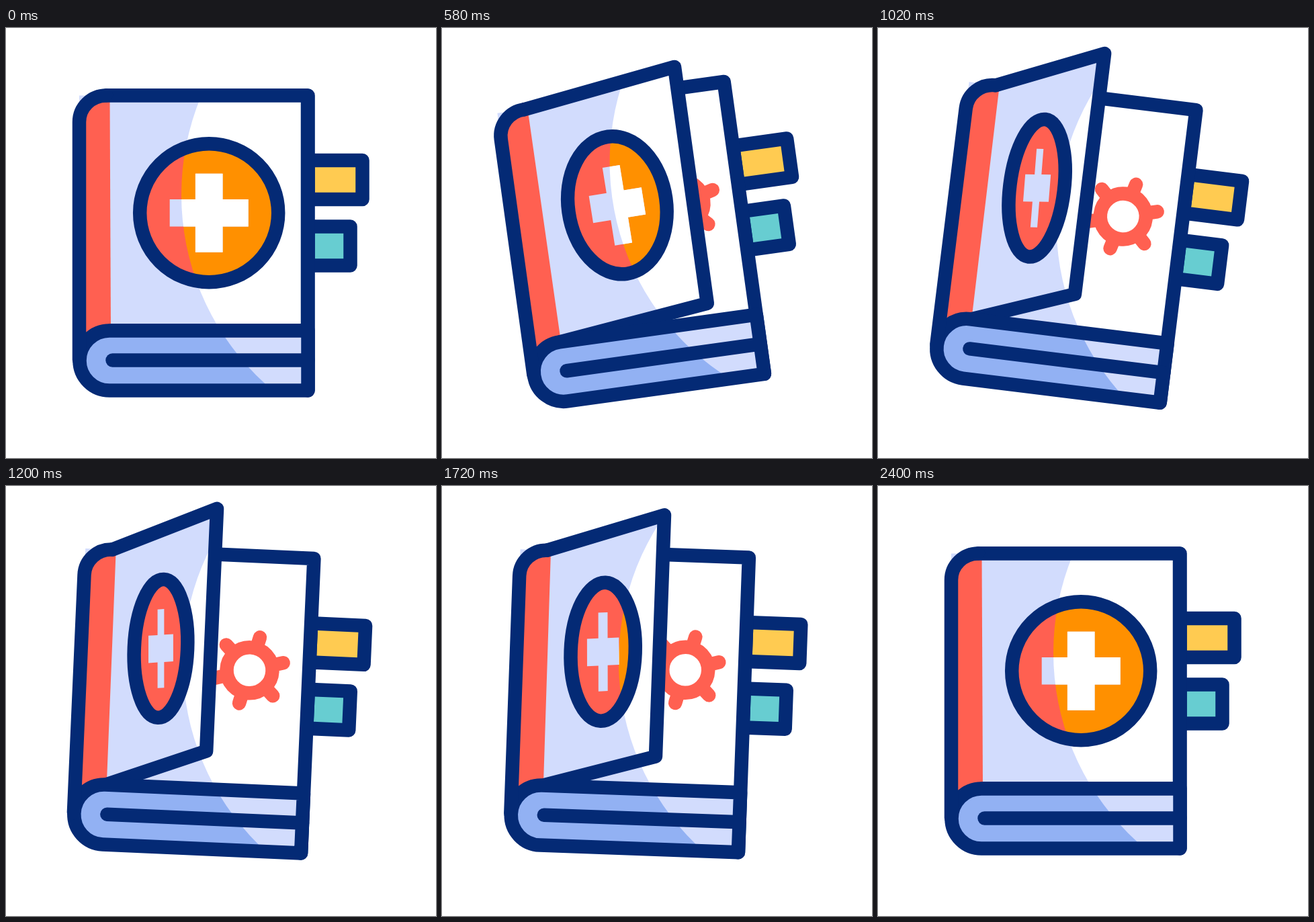
An HTML page with a canvas that plays this animation: 640 by 640 pixels, repeating every 3.6 s.

```html
<!DOCTYPE html>
<html lang="en">
<head>
<meta charset="utf-8">
<title>Medical book</title>
<style>
  html, body { margin: 0; width: 100%; height: 100%; overflow: hidden; background: #fff; }
  canvas { display: block; width: 100vmin; height: 100vmin; }
</style>
</head>
<body>
<canvas id="stage" width="640" height="640"></canvas>
<script>
const ctx = document.getElementById('stage').getContext('2d');
const LOOP = 3600, MAX_OPEN = 147, PIVOT = [286, 306.5];
const NAVY = '#042a75', RED = '#ff6051', ORANGE = '#ff9000', WHITE = '#fff';
const PALE = '#d2dcfd', BLUE = '#92b1f3', YELLOW = '#ffcb51', TEAL = '#67cdd1';

// Damped wobble of the whole book: [ms, degrees]
const WOBBLE = [[400, 0], [765, -16], [1056, 8], [1364, -4], [1676, 2.2], [1990, 0]];

// Everything inside this large circle is lit, the rest is in shade
const light = new Path2D();
light.arc(641, 248, 380, 0, 7);

const page = new Path2D('M109 100.5H449.5V450.5H109Z');
const pageEdge = new Path2D('M149 100.5H449.5V539.5');
const spine = new Path2D('M109 495V140A40 39.5 0 0 1 149 100.5H154.5L156 450.5Z');
const spineEdge = new Path2D('M109 494V140A40 39.5 0 0 1 149 100.5');
const block = new Path2D('M449.5 450.5H154A44.5 44.5 0 0 0 154 539.5H449.5Z');
const blockLine = new Path2D('M158.5 494.5H449.5');

const gear = new Path2D();
gear.arc(361, 271, 34, 0, 7);
for (let i = 0; i < 6; i++) {
  const a = (i * 60 - 75) * Math.PI / 180, c = Math.cos(a), s = Math.sin(a);
  gear.moveTo(361 + 36 * c, 271 + 36 * s);
  gear.lineTo(361 + 51.4 * c, 271 + 51.4 * s);
}

const clamp = p => Math.min(1, Math.max(0, p));
const smooth = p => p * p * (3 - 2 * p);

// cubic-bezier(a, 0, b, 1)
function bezier(p, a, b) {
  let lo = 0, hi = 1;
  for (let i = 0; i < 24; i++) {
    const t = (lo + hi) / 2, u = 1 - t;
    if (3 * a * t * u * u + 3 * b * t * t * u + t * t * t < p) lo = t; else hi = t;
  }
  return smooth(lo);
}

function tilt(t) {
  for (let i = 1; i < WOBBLE.length; i++) {
    const [t0, a] = WOBBLE[i - 1], [t1, b] = WOBBLE[i];
    if (t < t1) return a + (b - a) * smooth(clamp((t - t0) / (t1 - t0)));
  }
  return 0;
}

function opening(t) {
  if (t >= 2400) return 0;
  return MAX_OPEN * (t < 1200 ? bezier(t / 1200, .82, .15) : 1 - bezier((t - 1200) / 1200, .83, .7));
}

function fill(path, color) {
  ctx.fillStyle = color;
  ctx.fill(path);
}

function fillLit(path, shade, lit) {
  fill(path, shade);
  ctx.save();
  ctx.clip(light);
  fill(path, lit);
  ctx.restore();
}

function stroke(path, color = NAVY) {
  ctx.strokeStyle = color;
  ctx.stroke(path);
}

function tab(right, y, color) {
  const path = new Path2D();
  path.rect(449.5, y, right - 449.5, 58);
  fill(path, color);
  stroke(path);
}

function drawCover(d) {
  const edge = 449 - d, x = 302.2 - .507 * d, y = 275.3 - .21 * d;
  const cover = new Path2D(
    `M149 100.5L${edge} ${100.5 - .46 * d}V${450.5 - .385 * d}L155 450.5`);
  const disc = new Path2D();
  disc.ellipse(x, y, 103 - .431 * d, 103, 0, 0, 7);

  const arm = 58.5 - .273 * d, bar = 20.3 - .105 * d, h = 58.5, w = 20.3;
  const cross = new Path2D();
  [[-bar, -h], [bar, -h], [bar, -w], [arm, -w], [arm, w], [bar, w],
   [bar, h], [-bar, h], [-bar, w], [-arm, w], [-arm, -w], [-bar, -w]]
    .forEach(([px, py]) => cross.lineTo(x + px + py * d * .0003, y + py - px * d * d * 5e-6));
  cross.closePath();

  fillLit(cover, PALE, WHITE);
  fillLit(disc, RED, ORANGE);
  fillLit(cross, PALE, WHITE);
  stroke(disc);
  fill(spine, RED);
  stroke(cover);
}

function draw(t) {
  ctx.setTransform(1, 0, 0, 1, 0, 0);
  fill(new Path2D('M0 0H640V640H0Z'), WHITE);
  ctx.translate(...PIVOT);
  ctx.rotate(tilt(t) * Math.PI / 180);
  ctx.translate(-PIVOT[0], -PIVOT[1]);
  ctx.lineWidth = 20.5;
  ctx.lineCap = ctx.lineJoin = 'round';

  tab(530.5, 197, YELLOW);
  tab(512.5, 295.5, TEAL);
  fillLit(page, PALE, WHITE);
  stroke(gear, RED);
  stroke(pageEdge);
  drawCover(opening(t));
  fillLit(block, BLUE, PALE);
  [block, blockLine, spineEdge].forEach(p => stroke(p));
}

const start = performance.now();
function tick(now) {
  draw(Math.max(0, now - start) % LOOP);
  requestAnimationFrame(tick);
}
draw(0);
requestAnimationFrame(tick);
</script>
</body>
</html>
```
